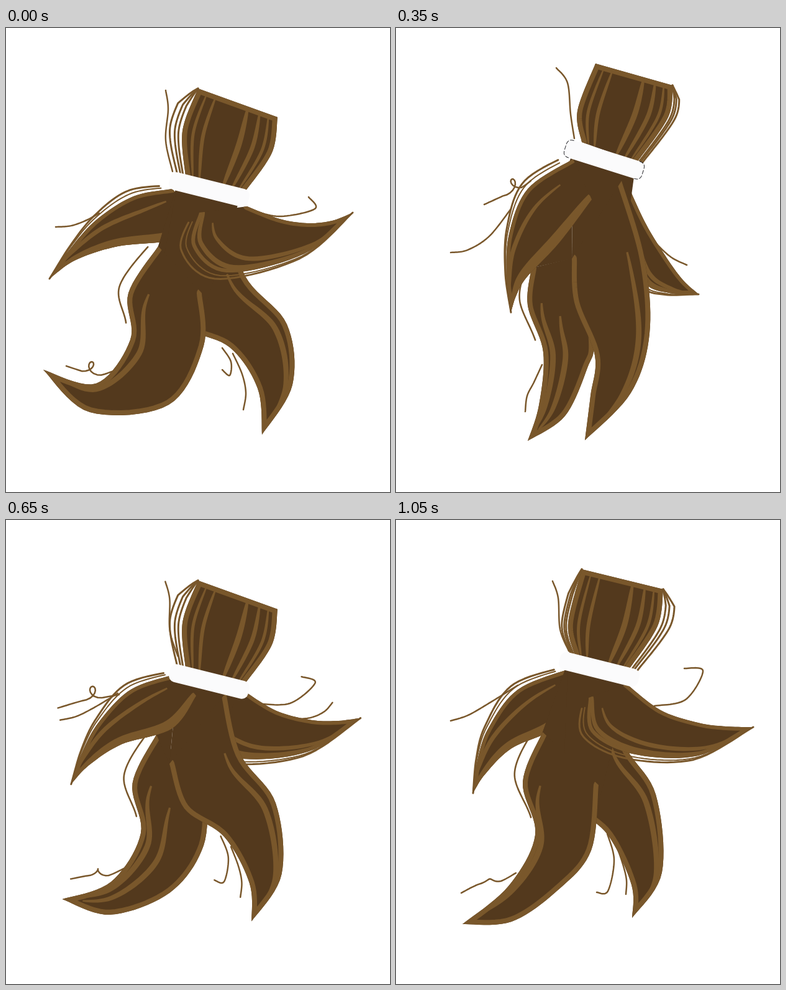
These frames come from a looping animation (618x744 px, 1.15 s). An HTML page with a canvas:

```html
<!DOCTYPE html>
<html lang="en">
<head>
<meta charset="utf-8">
<title>Running ponytail</title>
<style>
html, body { margin: 0; width: 100%; height: 100%; overflow: hidden; background: #fff; }
canvas { display: block; }
</style>
</head>
<body>
<canvas id="stage" width="618" height="744"></canvas>
<script>
const ctx = document.getElementById('stage').getContext('2d');
const LIGHT = '#79572b', DARK = '#53391d', LOOP = 1150, STEP = 50;

const pts = text => text.split(',').map(p => p.trim().split(' ').map(Number));

// Limbs: four points of one edge, the tip, four points of the other edge.
const limb = text => {
  const p = pts(text);
  return { a: p.slice(0, 5), b: [...p.slice(5), p[4]] };
};
// Head: three points up each side; loose is how far hairs stand off left and right.
const head = (a, b, left, right) => ({ a: pts(a), b: pts(b), loose: [left, right] });

// Blends numbers, arrays and objects; a missing side snaps halfway.
function mix(a, b, k) {
  if (a === undefined || b === undefined) return k < .5 ? a : b;
  if (typeof a === 'number') return a + (b - a) * k;
  if (Array.isArray(a)) return a.map((v, i) => mix(v, b[i], k));
  const out = {};
  for (const key of new Set([...Object.keys(a), ...Object.keys(b)])) out[key] = mix(a[key], b[key], k);
  return out;
}

const wide = {
  arms: [limb('268 258,205 270,145 308,100 358,70 402,303 300,275 338,180 350,112 372'),
    limb('388 286,440 306,485 313,525 309,558 296,311 296,300 350,355 392,480 362')],
  legs: [limb('245 350,197 425,200 500,145 570,60 548,315 425,318 510,262 604,135 616'),
    limb('245 415,285 478,360 512,405 578,412 652,354 290,385 398,452 475,461 572')],
  head: head('289 238,284 165,309 97', '385 262,428 200,437 143', .14, 0),
  tie: [327, 259, 14],
  curl: 10,
  hairs: {
    neck: pts('257 100,261 130,257 180,268 230'),
    arm: pts('80 319,105 317,130 308,150 297'),
    loop: pts('62 338,110 320,125 315,140 310'),
    hook: pts('390 290,440 302,497 290,487 271'),
    hook2: pts('505 350,505 320,508 300,520 285'),
    low: pts('97 542,125 551,150 557,185 545'),
    mid: pts('348 513,362 535,360 557,348 548'),
    drop: pts('365 522,380 555,386 585,382 612')
  }
};
const crouch = {
  arms: [limb('275 218,220 256,188 315,186 360,203 405,270 265,245 315,228 350,215 378'),
    limb('362 245,378 320,390 370,418 420,440 453,306 266,287 350,325 415,390 447')],
  legs: [limb('205 395,220 490,252 560,265 640,270 679,335 425,344 490,337 555,312 630'),
    limb('247 500,245 560,240 600,232 640,233 668,365 400,366 490,335 560,265 640')],
  head: head('296 190,289 140,318 64', '385 222,435 150,442 99', 0, .08),
  tie: [329, 217, 17.5],
  curl: 10,
  hairs: {
    neck: pts('255 71,273 95,278 145,284 184'),
    arm: pts('146 369,160 352,178 320,190 295'),
    mid: pts('215 470,216 505,210 527,194 525'),
    drop: pts('245 560,242 580,235 598,227 612')
  }
};
const rise = {
  arms: [limb('285 210,212 258,182 330,178 400,185 456,315 275,262 345,210 400,193 430'),
    limb('368 240,400 310,430 360,460 402,487 427,362 280,380 345,400 408,440 425')],
  legs: [limb('218 385,212 445,237 520,230 605,212 662,300 365,318 500,308 545,272 622'),
    limb('283 370,287 440,320 525,313 590,304 661,363 245,400 370,408 490,378 585')],
  head: head('299 183,292 133,321 57', '388 215,438 143,445 92', 0, .08),
  tie: [335, 211, 17.5],
  curl: 10,
  hairs: {
    neck: pts('258 64,276 88,281 138,287 177'),
    arm: pts('88 360,115 356,150 334,185 290'),
    loop: pts('142 283,175 268,200 257,217 245'),
    hook: pts('405 330,425 352,445 369,468 380'),
    mid: pts('235 540,222 568,211 590,208 615')
  }
};
const open = {
  arms: [limb('285 238,200 272,152 335,134 390,128 438,308 270,262 332,190 366,147 408'),
    limb('375 263,430 305,490 325,535 331,579 332,314 285,318 340,385 375,490 378')],
  legs: [limb('240 340,208 420,228 505,185 587,111 648,330 425,318 530,265 593,190 644'),
    limb('275 375,288 452,345 505,383 585,384 638,354 268,372 360,422 440,432 565')],
  head: head('291 215,281 165,303 79', '380 238,425 170,434 111', .07, .14),
  tie: [331, 239.5, 14],
  curl: 3,
  hairs: {
    neck: pts('256 98,265 125,268 175,282 210'),
    arm: pts('92 322,120 313,155 293,200 265'),
    loop: pts('98 277,138 268,168 266,210 260'),
    hook: pts('420 298,470 288,498 242,468 238'),
    hook2: pts('430 300,480 315,515 312,529 298'),
    low: pts('109 598,140 583,170 580,197 566'),
    mid: pts('344 503,355 545,345 595,327 597'),
    drop: pts('360 525,370 555,375 578,374 600')
  }
};
const settle = { ...mix(wide, open, .6), head: wide.head, tie: wide.tie };

// When each pose is reached, which side the front leg is on (0 left, 1 right), and its offset.
const STEPS = [
  { at: 0, pose: wide, side: 0, dx: 0, dy: 0 },
  { at: 200, pose: crouch, side: 0, dx: 0, dy: 0 },
  { at: 350, pose: rise, side: 1, dx: 0, dy: 0 },
  { at: 450, pose: open, side: 1, dx: 0, dy: 0 },
  { at: 650, pose: settle, side: 1, dx: 0, dy: 0 },
  { at: 800, pose: rise, side: 1, dx: -3, dy: 0 },
  { at: 900, pose: crouch, side: 0, dx: 0, dy: -9 },
  { at: 1050, pose: open, side: 0, dx: -4, dy: 0 },
  { at: LOOP, pose: wide, side: 0, dx: 0, dy: 0 }
].map(({ pose: { arms, legs, ...rest }, side, ...when }) => ({
  ...when, ...rest, side,
  frontLeg: legs[side], rearLeg: legs[1 - side],
  frontArm: arms[1 - side], rearArm: arms[side]
}));

// Point on the smooth curve through p, u from 0 to 1.
function along(p, u) {
  const last = p.length - 1, i = Math.min(Math.floor(u * last), last - 1);
  const t = u * last - i, v = 1 - t;
  const slope = (n, j) => (p[Math.min(n + 1, last)][j] - p[Math.max(n - 1, 0)][j]) / 2;
  return [0, 1].map(j => v * v * (1 + 2 * t) * p[i][j] + t * t * (3 - 2 * t) * p[i + 1][j]
    + t * v * v * slope(i, j) - t * t * v * slope(i + 1, j));
}
const sample = (fn, from = 0, to = 1) => Array.from({ length: 41 }, (_, i) => fn(mix(from, to, i / 40)));

// Point of a shape: f = 0 on edge a, 1 on edge b, beyond that outside.
const across = (s, f, u) => mix(along(s.a, u), along(s.b, u), f);

function trace(line) {
  ctx.beginPath();
  line.forEach(p => ctx.lineTo(...p));
}

function thin(line, w) {
  trace(line);
  ctx.lineWidth = w;
  ctx.strokeStyle = LIGHT;
  ctx.stroke();
}

// Loose hair outside a shape, meeting its edge at the end.
function loose(s, f, from, to, w) {
  const edge = f < 0 ? 0 : 1;
  if (w > .3) thin(sample(u => across(s, mix(edge, f, Math.min(1, 4 * (1 - u))), u), from, to), w);
}

// Light lock with tapered ends inside a shape.
function lock(s, f, from, to, w) {
  if (w < .5) return;
  const mid = sample(u => across(s, f, u), from, to), left = [], right = [];
  mid.forEach(([x, y], i) => {
    const p = mid[Math.max(i - 1, 0)], q = mid[Math.min(i + 1, 40)];
    const dx = q[0] - p[0], dy = q[1] - p[1];
    const r = w / 2 * Math.sqrt(Math.sin(Math.PI * mix(.04, .98, i / 40))) / (Math.hypot(dx, dy) || 1);
    left.push([x - dy * r, y + dx * r]);
    right.unshift([x + dy * r, y - dx * r]);
  });
  trace(left.concat(right));
  ctx.fillStyle = LIGHT;
  ctx.fill();
}

// Dark shape with a light rim inside; locks are kept within it.
function shape(s, rim, locks) {
  trace([...sample(u => along(s.a, u)), ...sample(u => along(s.b, 1 - u))]);
  ctx.fillStyle = DARK;
  ctx.fill();
  ctx.save();
  ctx.clip();
  ctx.lineWidth = rim * 2;
  ctx.strokeStyle = LIGHT;
  ctx.stroke();
  locks.forEach(l => lock(s, ...l));
  ctx.restore();
}

function arm(s, side) {
  const f = mix(-.13, 1.13, side);
  loose(s, f, .08, 1, 3);
  loose(s, mix(mix(0, 1, side), f, .5), .08, 1, 2);
  shape(s, 6, [[mix(.3, .72, side), .12, .88, 7], [.9, 0, .9, mix(15, 8, side)]]);
}

function leg(s, side, rear) {
  loose(s, -.12, .05, .45, 2.6 * (1 - side));
  shape(s, 8, [[mix(.22, .8, side), .2, .9, 9], [.5, .22, .88, rear ? 9 * (1 - side) : 0]]);
}

function torso({ tie: [x, y], frontLeg, rearLeg }) {
  const l = [x - 50, y - 13], r = [x + 50, y + 13], hip = frontLeg.a[0];
  ctx.fillStyle = DARK;
  for (const line of [[l, r, along(frontLeg.b, .1), along(frontLeg.a, .25), hip], [l, hip, rearLeg.a[0]]]) {
    trace(line);
    ctx.fill();
  }
}

function crown(s) {
  s.loose.forEach((far, side) => {
    for (const k of [1, .6, .3]) {
      if (far > .01) loose(s, side ? 1 + far * k : -far * k, 0, 1, 3);
    }
  });
  shape(s, 8, [[.12, 0, .97, 5], [.23, 0, .97, 6], [.63, 0, .97, 9], [.78, 0, .97, 7], [.89, 0, .97, 5]]);
}

function flyaways({ hairs, curl }, t) {
  for (const [name, p] of Object.entries(hairs)) {
    if (!p || (/loop|hook2/.test(name) && (t < 350 || t > 800))) continue;
    const r = name === 'loop' ? 10 : name === 'low' ? curl : 0;
    thin(sample(u => {
      const [x, y] = along(p, u);
      const turn = 2 * Math.PI * Math.min(1, Math.max(0, (u - .3) / .4));
      return [x + r * Math.sin(turn), y - r * (1 - Math.cos(turn))];
    }), 2.5);
  }
}

function band([x, y, tilt]) {
  ctx.save();
  ctx.translate(x, y);
  ctx.rotate(tilt * Math.PI / 180);
  ctx.fillStyle = '#fbfbfc';
  ctx.beginPath();
  ctx.roundRect(-65.5, -14.5, 131, 29, 10);
  ctx.fill();
  ctx.globalAlpha = (tilt - 14) / 3.5; // the dashed ends show when it tilts
  ctx.strokeStyle = '#2c2c30';
  ctx.lineWidth = 1;
  ctx.setLineDash([6, 3]);
  for (const e of [-65.5, 65.5]) {
    ctx.beginPath();
    ctx.moveTo(e * .85, -14.5);
    ctx.quadraticCurveTo(e, -14.5, e, -5);
    ctx.lineTo(e, 5);
    ctx.quadraticCurveTo(e, 14.5, e * .85, 14.5);
    ctx.stroke();
  }
  ctx.restore();
}

ctx.lineCap = ctx.lineJoin = 'round';
const start = performance.now();

function draw() {
  let t = Math.floor((performance.now() - start) % LOOP / STEP) * STEP;
  if (t === 600 || t === 1100) t -= STEP; // two poses are held twice as long
  const i = STEPS.findIndex((s, n) => t >= s.at && t < STEPS[n + 1].at);
  const now = mix(STEPS[i], STEPS[i + 1], (t - STEPS[i].at) / (STEPS[i + 1].at - STEPS[i].at));

  ctx.fillStyle = '#fff';
  ctx.fillRect(0, 0, 618, 744);
  ctx.save();
  ctx.translate(now.dx, now.dy);
  flyaways(now, t);
  arm(now.rearArm, now.side);
  leg(now.rearLeg, 1 - now.side, true);
  torso(now);
  leg(now.frontLeg, now.side, false);
  arm(now.frontArm, 1 - now.side);
  crown(now.head);
  band(now.tie);
  ctx.restore();
  requestAnimationFrame(draw);
}
draw();
</script>
</body>
</html>
```
